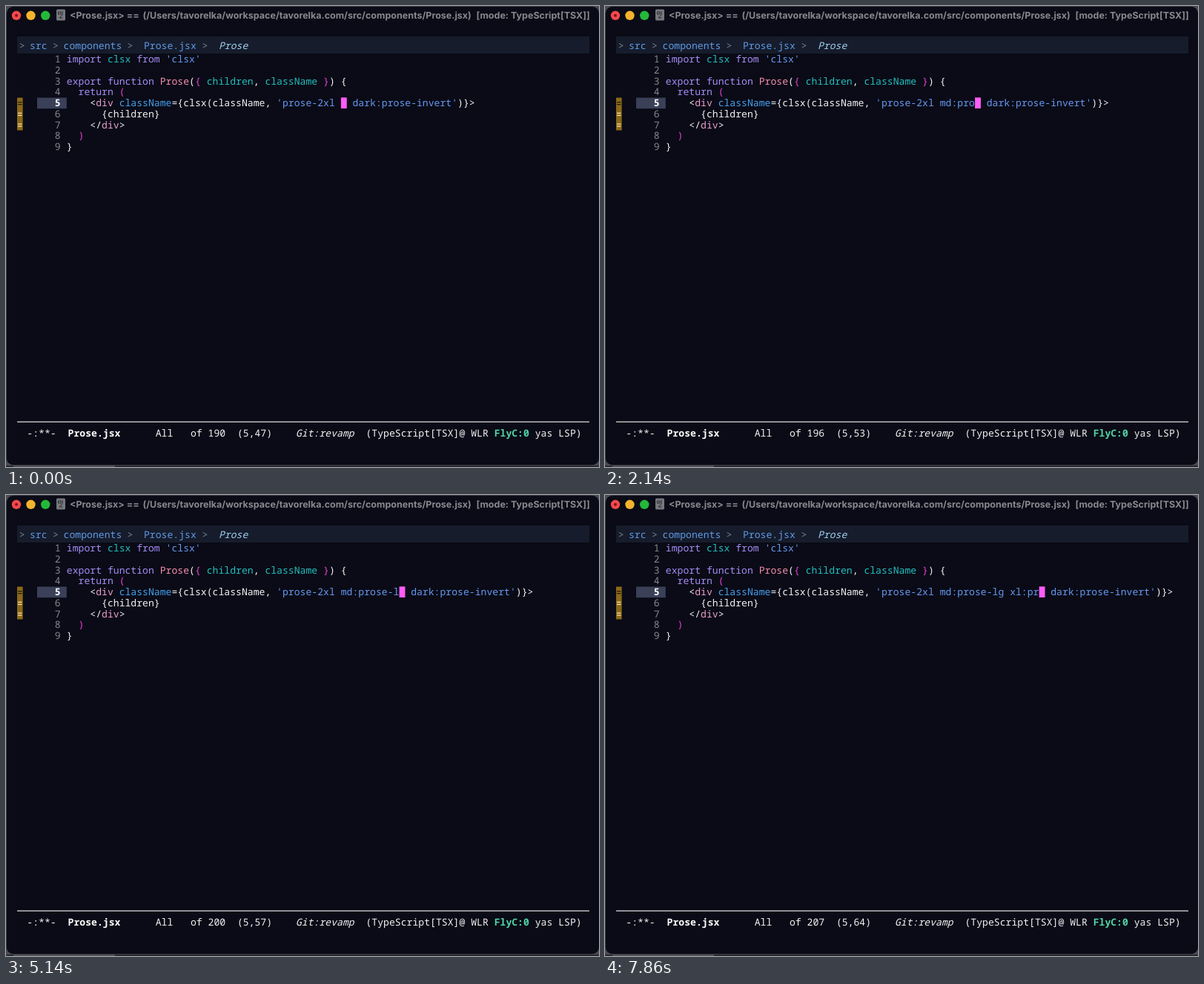
Recreate the animation shown at these times as an HTML page with a canvas. Size 800 by 621 pixels, loop 8 s.

```html
<!DOCTYPE html>
<html lang="en">
<head>
<meta charset="utf-8">
<title>Prose.jsx</title>
<style>
  html, body { margin: 0; width: 100%; height: 100%; overflow: hidden; background: #0a0b16; }
  canvas { display: block; }
</style>
</head>
<body>
<canvas id="stage" width="800" height="621"></canvas>
<script>
const ctx = document.getElementById('stage').getContext('2d');
const LOOP = 8000;
const CW = 7.87, ROW = 14.72, LEFT = 81.8, BASE = 76.3;
const MONO = '"Noto Sans Mono", "DejaVu Sans Mono", monospace';
const C = {
  bg: '#0a0b16', panel: '#161c2a', fg: '#f4f4f6', dim: '#85868c',
  keyword: '#a68cf6', string: '#6798f2', cyan: '#22bfc0', func: '#f58fae',
  tag: '#eb9fd0', attr: '#45a0ee', paren: '#e540d8', cursor: '#ff5cf8',
  note: '#9db9d0', link: '#5f9ae6', red: '#f0626f', blue: '#3fa0f5'
};

// Keystrokes: [time in ms, typed character]
const KEYS = [
  [430, 'm'], [710, 'd'], [1140, ':'], [1710, 'p'], [1860, 'r'],
  [2140, 'o'], [2290, 's'], [2430, 'e'], [3000, '-'], [4290, 'l'],
  [5290, 'g'], [5570, ' '], [6290, 'x'], [6430, 'l'],
  [7000, ':'], [7430, 'p'], [7570, 'r']
];
const POPUP = [2570, 3000];

function rect(x, y, w, h, color) {
  ctx.fillStyle = color;
  ctx.fillRect(x, y, w, h);
}

function dot(x, y, r, color) {
  ctx.fillStyle = color;
  ctx.beginPath();
  ctx.arc(x, y, r, 0, Math.PI * 2);
  ctx.fill();
}

function stroke(points, color, width = 1.3) {
  ctx.strokeStyle = color;
  ctx.lineWidth = width;
  ctx.lineJoin = 'round';
  ctx.beginPath();
  points.forEach(([x, y], i) => i ? ctx.lineTo(x, y) : ctx.moveTo(x, y));
  ctx.stroke();
}

// Monospaced text on the character grid; returns the next x.
function mono(text, x, y, color, style = '500') {
  ctx.font = `${style} 13.12px ${MONO}`;
  ctx.fillStyle = color;
  for (const ch of text) {
    if (ch !== ' ') ctx.fillText(ch, x, y);
    x += CW;
  }
  return x;
}

function runs(list, x, y) {
  for (const [text, color, style] of list) x = mono(text, x, y, color, style);
}

function titleBar() {
  dot(14, 12.8, 6.2, '#f2494c');
  dot(14, 12.8, 2, '#7c1216');
  dot(33.5, 12.8, 6.2, '#f5b32d');
  dot(53.2, 12.8, 6.2, '#24b83a');
  ctx.fillStyle = '#77787d';
  ctx.beginPath();
  ctx.roundRect(68, 4.5, 12, 15, 1.5);
  ctx.fill();
  stroke([[70.5, 8], [74, 8], [74, 11], [70.5, 11], [70.5, 8]], '#2a2b33', 1);
  stroke([[76, 7], [76, 12], [72, 16], [76.5, 16]], '#2a2b33', 1);
  ctx.font = '700 12.5px Inter, "Open Sans", sans-serif';
  ctx.fillStyle = '#88898f';
  ctx.fillText('<Prose.jsx> ==', 86, 17.2);
  ctx.fillText('(/Users/tavorelka/workspace/tavorelka.com/src/components/Prose.jsx)', 184.5, 17.2);
  ctx.fillText('[mode: TypeScript[TSX]]', 634.5, 17.2);
}

function breadcrumb() {
  rect(15, 41, 772, 23, '#161c2b');
  const y = 57.6;
  for (const x of [17.8, 63, 163.5, 264.5]) mono('>', x, y, '#77828f');
  mono('src', 32, y, C.link);
  mono('components', 77.6, y, C.link);
  mono('Prose.jsx', 186, y, C.link);
  mono('Prose', 287, y, '#9ed0f2', 'italic 500');
}

function code(typed) {
  const lines = [
    [['import ', C.keyword], ['clsx ', C.cyan], ['from ', C.keyword], ["'clsx'", C.string]],
    [],
    [['export function ', C.keyword], ['Prose', C.func], ['(', C.fg], ['{ ', C.paren],
     ['children', C.cyan], [', ', C.fg], ['className ', C.cyan], ['}', C.paren], [') {', C.fg]],
    [['  return ', C.keyword], ['(', C.paren]],
    [['    <', C.fg], ['div ', C.tag], ['className', C.attr], ['={clsx(className, ', C.fg],
     [`'prose-2xl ${typed}  dark:prose-invert'`, C.string], [')}>', C.fg]],
    [['      {children}', C.fg]],
    [['    </', C.fg], ['div', C.tag], ['>', C.fg]],
    [['  )', C.paren]],
    [['}', C.fg]]
  ];

  rect(42, 123.5, 39.8, 14.7, '#3b4059');
  lines.forEach((line, i) => {
    const y = BASE + i * ROW, here = i === 4;
    mono(String(i + 1), 65.8, y, here ? '#ffffff' : C.dim, here ? '700' : '500');
    runs(line, LEFT, y);
  });
  rect(LEFT + (47 + typed.length) * CW + 0.2, 123.3, CW, 14.7, C.cursor);

  rect(15, 123.5, 7.6, 44, '#8a6918');
  for (let i = 0; i < 3; i++) {
    const y = 129 + i * ROW, color = i ? '#ffe7b0' : '#211a0c';
    rect(16, y, 5.5, 1.2, color);
    rect(16, y + 3, 5.5, 1.2, color);
  }
}

function fileIcon(y) {
  stroke([[106, y - 6], [113, y - 6], [117, y - 2], [117, y + 7], [106, y + 7], [106, y - 6]], C.red, 1.5);
  stroke([[113, y - 6], [113, y - 2], [117, y - 2]], C.red, 1.2);
  stroke([[110.3, y], [108.3, y + 2.2], [110.3, y + 4.4]], C.red, 1.1);
  stroke([[112.7, y], [114.7, y + 2.2], [112.7, y + 4.4]], C.red, 1.1);
}

function lockIcon(y) {
  ctx.strokeStyle = C.blue;
  ctx.lineWidth = 1.5;
  ctx.beginPath();
  ctx.arc(111.3, y - 3.7, 3, Math.PI, 0);
  ctx.stroke();
  stroke([[112, y + 6.3], [106, y + 6.3], [106, y - 1.6], [117, y - 1.6], [117, y + 1]], C.blue, 1.5);
  dot(111.3, y + 2, 1.4, C.blue);
  stroke([[114, y + 2.8], [118.5, y + 7]], C.blue, 1.5);
  stroke([[118.5, y + 2.8], [114, y + 7]], C.blue, 1.5);
}

function popup() {
  const rule = s => `& :is(:where(${s}):not(:where([class~="not-prose"] *))) (Module)`;
  const heads = [1, 2, 3, 4, 5, 6].map(n => 'h' + n);
  const rows = [
    ['prose', '(Constant)'],
    ['prose-headings:', rule([...heads, 'th'].join(', '))],
    ...[...heads, 'p'].map(s => [`prose-${s}:`, rule(s)])
  ];
  ctx.save();
  ctx.beginPath();
  ctx.rect(96, 138, 704, 150);
  ctx.clip();
  rect(96, 138, 704, 150, '#6d7282');
  rect(97, 139, 703, 148, C.panel);
  ctx.beginPath();
  ctx.rect(97, 139, 703, 148);
  ctx.clip();
  rows.forEach(([label, note], i) => {
    const mid = 148.8 + i * 17.75, y = mid + 4.4;
    if (i) fileIcon(mid - 0.5); else lockIcon(mid - 0.5);
    runs([['pro', C.blue], [label.slice(3), C.fg]], 124, y);
    const x = Math.max(802 - note.length * CW, 124 + (label.length + 1) * CW);
    mono(note, x, y, C.note, 'italic 500');
  });
  ctx.restore();
}

function modeLine(count) {
  const y = 580.3;
  rect(15, 559.6, 772, 1.2, '#e6e6ea');
  mono('-:**-', 28.3, y, C.fg);
  mono('Prose.jsx', 83.6, y, '#ffffff', '700');
  mono(`All   of ${190 + count}  (5,${47 + count})`, 201.7, y, C.fg);
  mono('Git:revamp', 391, y, C.fg, 'italic 500');
  runs([['(TypeScript[TSX]@ WLR ', C.fg], ['FlyC:0', '#52d3a6', '700'], [' yas LSP)', C.fg]], 485.5, y);
}

function windowFrame() {
  rect(0, 0, 800, 621, '#4a4b52');
  ctx.fillStyle = C.bg;
  ctx.beginPath();
  ctx.roundRect(0.8, 0.8, 799.2, 617.4, 9);
  ctx.fill();
  rect(0, 619.2, 800, 1.8, '#24252d');
  rect(10, 619.2, 137, 1.8, '#55565c');
}

function draw(t) {
  const typed = KEYS.filter(k => k[0] <= t).map(k => k[1]).join('');
  windowFrame();
  titleBar();
  breadcrumb();
  code(typed);
  if (t >= POPUP[0] && t < POPUP[1]) popup();
  modeLine(typed.length);
}

ctx.textRendering = 'geometricPrecision';
const start = performance.now();
function tick() {
  draw((performance.now() - start) % LOOP);
  requestAnimationFrame(tick);
}
tick();
</script>
</body>
</html>
```
